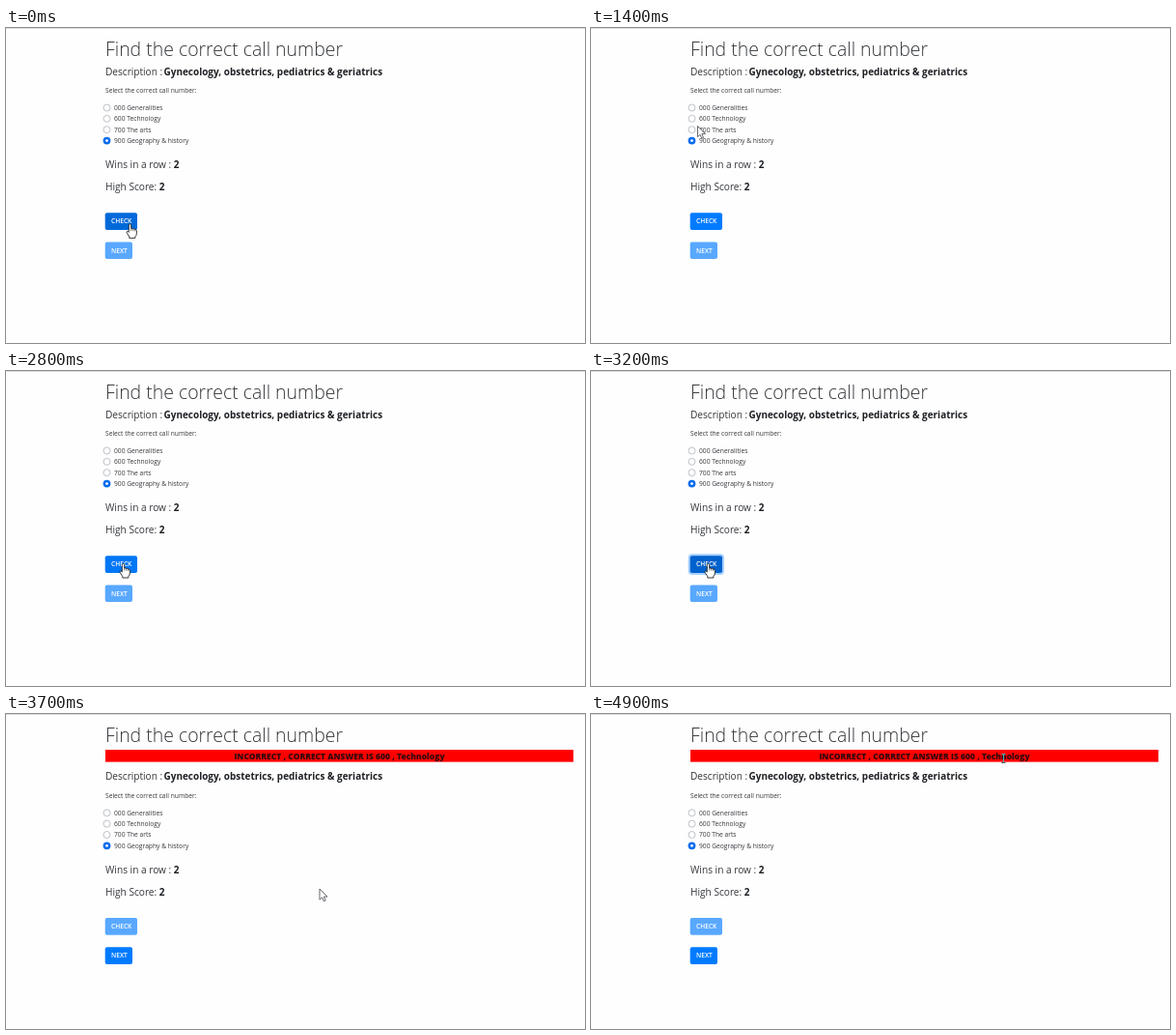
Recreate the animation shown at these times as an HTML page with a canvas. Size 600 by 326 pixels, loop 5000 ms.

```html
<!DOCTYPE html>
<html lang="en">
<head>
<meta charset="utf-8">
<title>Find the correct call number</title>
<style>
html, body { margin: 0; width: 100%; height: 100%; overflow: hidden; background: #fefefe; }
canvas { display: block; width: 600px; height: 326px; }
</style>
</head>
<body>
<canvas id="stage"></canvas>
<script>
const W = 600, H = 326, LOOP = 5000, STEP = 100;
const PRESS_AT = 3200, ANSWER_AT = 3300, BANNER_SHIFT = 19.8;
const INK = '#33363b', BOLD_INK = '#1d2024';
const BLUE = [0, 123, 255], HOVER = [0, 105, 217], ACTIVE = [0, 98, 204];
const PALE = [89, 168, 255], PALE_HOVER = [89, 157, 230];
const OPTIONS = ['000 Generalities', '600 Technology', '700 The arts', '900 Geography & history'];
const CHOSEN = 3;

// Pointer path: time, x, y of the hot spot, shape from that time on
const PATH = [
  [0, 128.5, 202.8, 'hand'],
  [100, 128.5, 202.8, 'hand'],
  [200, 126, 186, 'arrow'],
  [400, 115, 125, 'arrow'],
  [600, 111, 102.5, 'arrow'],
  [800, 111, 102.5, 'arrow'],
  [900, 110.5, 101.5, 'arrow'],
  [1400, 110.5, 101.5, 'arrow'],
  [1500, 175, 58, 'beam'],
  [1800, 410, 43, 'beam'],
  [1900, 387, 42, 'beam'],
  [2000, 282.5, 50, 'beam'],
  [2100, 220, 75, 'arrow'],
  [2300, 145, 175, 'arrow'],
  [2500, 125.5, 210.5, 'arrow'],
  [2800, 121.5, 199.4, 'hand'],
  [3200, 121.5, 199.4, 'hand'],
  [3300, 216.5, 195, 'arrow'],
  [3700, 325, 181, 'arrow'],
  [4300, 374, 164.5, 'arrow'],
  [4500, 400, 90, 'arrow'],
  [4600, 430, 46, 'beam'],
  [4700, 464, 42, 'beam'],
  [4900, 427.5, 46, 'beam']
];

const canvas = document.getElementById('stage');
const ctx = canvas.getContext('2d');
const ratio = window.devicePixelRatio || 1;
canvas.width = W * ratio;
canvas.height = H * ratio;

const rgb = c => `rgb(${c.map(Math.round).join(',')})`;
const mix = (a, b, k) => a.map((v, i) => v + (b[i] - v) * k);
const ramp = (t, from, to) => Math.min(1, Math.max(0, (t - from) / (to - from)));

function text(str, x, y, size, weight = 400, color = INK, align = 'left') {
  ctx.font = `${weight} ${size}px "Open Sans", "Noto Sans", sans-serif`;
  ctx.fillStyle = color;
  ctx.textAlign = align;
  ctx.fillText(str, x, y);
}

function disc(x, y, r, fill, stroke) {
  ctx.beginPath();
  ctx.arc(x, y, r, 0, Math.PI * 2);
  ctx.fillStyle = fill;
  ctx.fill();
  if (stroke) {
    ctx.strokeStyle = stroke;
    ctx.lineWidth = 0.8;
    ctx.stroke();
  }
}

function box(x, y, w, h, r, fill) {
  ctx.beginPath();
  ctx.roundRect(x, y, w, h, r);
  ctx.fillStyle = fill;
  ctx.fill();
}

function button(label, y, w, color, ring = 0) {
  const x = 102.7, h = 17.6;
  if (ring) box(x - ring, y - ring, w + 2 * ring, h + 2 * ring, 2 + ring, 'rgba(0,123,255,0.35)');
  box(x, y, w, h, 2, rgb(color));
  text(label, 109, y + 11.1, 6.65, 600, '#fff');
}

function checkColor(t) {
  if (t < 2700) return mix(HOVER, BLUE, ramp(t, 100, 300));
  if (t < PRESS_AT) return mix(BLUE, HOVER, ramp(t, 2770, 2900));
  if (t < ANSWER_AT) return ACTIVE;
  return mix(PALE_HOVER, PALE, ramp(t, ANSWER_AT, ANSWER_AT + 150));
}

function focusRing(t) {
  return 2 * ramp(t, PRESS_AT - 100, PRESS_AT) * (1 - ramp(t, PRESS_AT, PRESS_AT + 200));
}

function page(t) {
  const answered = t >= ANSWER_AT;

  ctx.fillStyle = '#fefefe';
  ctx.fillRect(0, 0, W, H);
  ctx.fillStyle = '#dedee0';
  ctx.fillRect(0, 0, W, 1);

  text('Find the correct call number', 103, 29, 19.45, 300, '#33363a');
  if (answered) {
    ctx.fillStyle = '#ff0000';
    ctx.fillRect(103, 37, 485, 12.6);
    text('INCORRECT , CORRECT ANSWER IS 600 , Technology', 345.5, 46.5, 8.5, 800, '#34090c', 'center');
  }

  ctx.save();
  ctx.translate(0, answered ? BANNER_SHIFT : 0);
  text('Description :', 103, 48.5, 10.1);
  text('Gynecology, obstetrics, pediatrics & geriatrics', 163.5, 48.5, 9.97, 700, BOLD_INK);
  text('Select the correct call number:', 103, 67, 6.7);
  OPTIONS.forEach((label, i) => {
    const y = 82.5 + i * 11.35;
    if (i === CHOSEN) {
      disc(104.5, y, 3.9, rgb([5, 108, 236]));
      disc(104.5, y, 1.4, '#fff');
    } else {
      disc(104.5, y, 3.5, '#fff', '#adb1b8');
    }
    text(label, 112, y + 2.4, 6.7);
  });
  text('Wins in a row :', 103, 144.9, 10.15);
  text('2', 173.8, 144.9, 10, 700, BOLD_INK);
  text('High Score:', 103, 167.9, 10.15);
  text('2', 158.8, 167.9, 10, 700, BOLD_INK);
  button('CHECK', 191.3, 33.3, checkColor(t), focusRing(t));
  button('NEXT', 221.5, 28.3, answered ? BLUE : PALE);
  ctx.restore();
}

const arrowShape = new Path2D('M0 0V11.2L2.6 8.8L4.3 12.8L6.1 12L4.4 8.1H8Z');
const handShape = new Path2D(
  'M-1.2 1.1Q-1.2 0 0 0Q1.2 0 1.2 1.1V4.8Q2.3 4.2 3.1 5.1Q4.3 4.6 5 5.6' +
  'Q6.8 5.3 6.9 7V9.5Q6.9 12 5.4 13V14.6H-0.7V13.2L-3.2 9.4' +
  'Q-4 8.1-3 7.6Q-2.2 7.3-1.2 8.6Z');
const handLines = new Path2D('M1.2 4.8V7.2M3.2 5.2V7.4M5.1 5.7V7.6');
const beamShape = new Path2D('M-2-4.5Q0-4.5 0-3.5Q0-4.5 2-4.5M0-3.5V3.5M-2 4.5Q0 4.5 0 3.5Q0 4.5 2 4.5');

function pointer(t) {
  let i = PATH.length - 1;
  while (PATH[i][0] > t) i--;
  const a = PATH[i], b = PATH[i + 1] || a;
  const k = a === b ? 0 : ramp(t, a[0], b[0]);
  const [x, y] = mix([a[1], a[2]], [b[1], b[2]], k);

  ctx.save();
  ctx.translate(x, y);
  ctx.lineJoin = 'round';
  ctx.lineWidth = 0.9;
  if (a[3] === 'beam') {
    // The text cursor inverts what lies under it
    ctx.globalCompositeOperation = 'difference';
    ctx.strokeStyle = '#d0d0d0';
    ctx.stroke(beamShape);
  } else {
    const hand = a[3] === 'hand';
    const shape = hand ? handShape : arrowShape;
    ctx.fillStyle = '#fff';
    ctx.fill(shape);
    ctx.strokeStyle = hand ? '#222' : '#55575c';
    ctx.stroke(shape);
    if (hand) {
      ctx.lineWidth = 0.6;
      ctx.stroke(handLines);
    }
  }
  ctx.restore();
}

let start;
function draw(now) {
  if (start === undefined) start = now;
  const t = Math.floor(((now - start) % LOOP) / STEP) * STEP;
  ctx.setTransform(ratio, 0, 0, ratio, 0, 0);
  page(t);
  pointer(t);
  requestAnimationFrame(draw);
}
requestAnimationFrame(draw);
</script>
</body>
</html>
```
